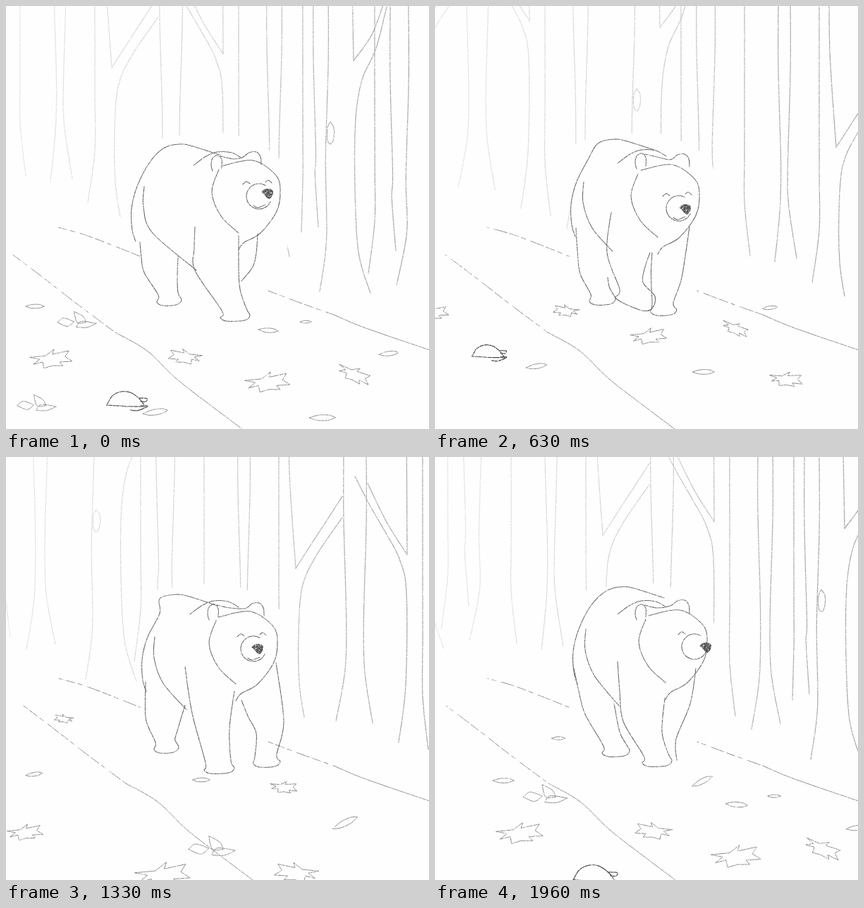
These frames come from a looping animation (600x600 px, 2090 ms). An HTML page:

```html
<!DOCTYPE html>
<html lang="en">
<head>
<meta charset="utf-8">
<title>Bear walking through a forest</title>
<style>
html, body { margin: 0; width: 100%; height: 100%; overflow: hidden; background: #fefefe; }
svg { display: block; width: 100vw; height: 100vh; }
path { fill: none; stroke-linecap: round; stroke-linejoin: round; }
.tree { stroke: url(#haze); stroke-width: 1.3; }
.path { stroke: #858585; stroke-width: 1; }
.leaf { stroke: #858585; stroke-width: 1; }
.rock { stroke: #404040; stroke-width: 1.25; }
.bear { stroke: #626262; stroke-width: 1.1; }
.clear { fill: #fefefe; }
.dash { stroke-dasharray: 13 5 6 8 19 4; }
.nose { stroke: #555; fill: #505050; }
.cel { opacity: 0; animation: 2090ms step-end infinite; }
</style>
</head>
<body>
<svg viewBox="0 0 600 600">
  <defs>
    <linearGradient id="haze" gradientUnits="userSpaceOnUse" x1="0" y1="0" x2="600" y2="0">
      <stop offset="0" stop-color="#e6e6e6"/>
      <stop offset=".5" stop-color="#d0d0d0"/>
      <stop offset=".8" stop-color="#adadad"/>
      <stop offset="1" stop-color="#a6a6a6"/>
    </linearGradient>
    <filter id="pencil" filterUnits="userSpaceOnUse" x="0" y="0" width="600" height="600" color-interpolation-filters="sRGB">
      <feTurbulence type="fractalNoise" baseFrequency=".45" numOctaves="2" seed="4"/>
      <feColorMatrix values="0 0 0 0 0  0 0 0 0 0  0 0 0 0 0  2.4 0 0 0 -.3" result="grain"/>
      <feComposite in="SourceGraphic" in2="grain" operator="in"/>
    </filter>
  </defs>
  <g filter="url(#pencil)"><g id="forest"></g><g id="bear"></g></g>
</svg>
<script>
const LOOP = 2090;
const SCENE_TIMES = [0, 300, 600, 900, 1200, 1500, 1800, LOOP];
const POSE_TIMES = [0, 130, 300, 470, 630, 800, 900, 1030, 1170, 1330, 1500, 1670, 1830, 1960, LOOP];
const forest = document.getElementById("forest");
const bear = document.getElementById("bear");
const sheet = document.head.appendChild(document.createElement("style"));

function add(parent, tag, attrs) {
  const el = document.createElementNS("http://www.w3.org/2000/svg", tag);
  for (const k in attrs) el.setAttribute(k, attrs[k]);
  return parent.appendChild(el);
}

function pairs(n) {
  const pts = [];
  for (let i = 0; i < n.length; i += 2) pts.push([n[i], n[i + 1]]);
  return pts;
}

// Catmull-Rom spline through the points.
function spline(pts) {
  let d = "M" + pts[0];
  for (let i = 0; i < pts.length - 1; i++) {
    const b = pts[i], c = pts[i + 1], a = pts[i - 1] || b, e = pts[i + 2] || c;
    const mix = (p, q, r) => [0, 1].map(k => (p[k] + (q[k] - r[k]) / 6).toFixed(1));
    d += "C" + [mix(b, c, a), mix(c, b, e), c].join(" ");
  }
  return d;
}

// Draws a flat run of coordinates, moved to x, y.
function draw(g, cls, nums, x = 0, y = 0) {
  return add(g, "path", { class: cls, d: spline(pairs(nums).map(p => [p[0] + x, p[1] + y])) });
}

// Shows cel i whenever its turn comes round in the list of times.
function cel(parent, name, i, count, times) {
  const at = ms => ms === LOOP ? "100%" : Math.max(0, (ms - .3) / LOOP * 100).toFixed(4) + "%";
  let keys = "0%{opacity:0}";
  for (let k = i; k < times.length - 1; k += count) {
    keys += `${at(times[k])}{opacity:1}${at(times[k + 1])}{opacity:0}`;
  }
  sheet.textContent += `@keyframes ${name}${i}{${keys}}`;
  return add(parent, "g", { class: "cel", style: `animation-name:${name}${i}` });
}

// --- Forest: one repeating strip of trunks that slides left and up ---
const STRIP = 593, RISE = .27;
const slide = [0, 106, 174, 244, 332, 418, 505];

// Trunk edges: place on the strip, sway of the foot, length, least x.
const trunks = [
  [20, 8, 236], [69, -6, 231], [84, 10, 222], [126, -10, 245], [219, -12, 245],
  [249, 10, 240], [330, 8, 255], [371, -10, 262], [390, 12, 250], [421, -2, 207, 400],
  [437, 6, 195, 400], [456, -11, 282], [523, -9, 238], [546, 7, 200], [570, -16, 242]
];
const forks = [
  { at: 150, art: ["-10 -220 -9 -90 0 47", "0 47 27 5 66 -55", "66 -25 29 29 9 74 4 139 5 210 12 258"] },
  { at: 304, art: ["-52 -115 -25 -60 4 -14", "3 -220 4 -14", "-70 -125 -50 -86 -27 -46 -7 -8 3 40 2 170 -8 252"] },
  { at: 491, art: ["-1 -220 2 -55", "2 -55 28 -92 46 -140", "51 -140 34 -73 14 -28 5 27 4 127 9 217 26 275"] }
];
const knot = [-1, 30, -5, 38, -5, 56, 0, 61, 4, 52, 4, 38, -1, 30];
const hollow = [194, 310, 192, 235, 205, 193, 300, 180, 350, 192, 380, 210, 396, 238, 399, 350, 390, 420, 200, 420];

function eachCopy(place, s, fn) {
  for (const turn of [0, STRIP]) {
    const x = place - slide[s] + turn;
    if (x > -70 && x < 680) fn(x, RISE * x);
  }
}

function growTrees(g, s) {
  trunks.forEach(([place, foot, end, least = -70], i) => {
    const sway = 3 * Math.sin(i * 2.1);
    eachCopy(place, s, (x, y) => {
      if (x > least) draw(g, "tree", [0, -220, -sway / 2, -60, sway, 90, sway / 2, end - 75, foot, end], x, y);
    });
  });
  for (const { at, art } of forks) {
    eachCopy(at, s, (x, y) => art.forEach(a => draw(g, "tree", a.split(" ").map(Number), x, y)));
  }
  eachCopy(461, s, (x, y) => draw(g, "tree", knot, x, y + 10));
  draw(g, "clear", hollow);
}

// --- Trail edges ---
const drift = [-5, -3, 0, 8, 10, 6, 1];
function layTrail(g, s) {
  const lines = [
    ["path dash", [15, 353, 60, 387, 105, 422, 160, 463], drift[s]],
    ["path", [160, 463, 205, 489, 247, 529, 300, 570, 340, 600], drift[s]],
    ["path dash", [74, 314, 110, 324, 150, 339, 190, 355], 0],
    ["path dash", [372, 404, 420, 422, 465, 438], 0],
    ["path", [465, 438, 500, 453, 545, 469, 601, 488], 0]
  ];
  for (const [cls, nums, dx] of lines) {
    draw(g, cls, nums, dx).setAttribute("stroke-dashoffset", s * 11);
  }
}

// --- Litter: everything on the ground shares one motion ---
const ground = [[0, 0], [-24, -28], [-68, -65], [-122, -96], [-172, -126], [-224, -155], [-274, -185]];
const STRIDE = [330, 218];
const shapes = {
  maple: { cls: "leaf", tall: .46, sharp: true, art: ["-50 -6 -13 -14 7 -48 3 -22 42 -40 33 -10 50 14 20 18 28 37 3 37 -17 50 -20 18 -42 30 -27 4 -50 -6"] },
  oval: { cls: "leaf", tall: .22, art: ["-50 0 -15 -45 25 -45 50 0", "-50 0 -20 45 20 45 50 0"] },
  trio: { cls: "leaf", tall: .5, art: ["-2 34 10 5 48 15", "-2 34 25 35 48 15", "-8 -45 0 10 22 10", "-8 -45 15 -20 22 10", "-50 10 -35 -12 -8 6", "-50 10 -25 30 -8 6"] },
  rock: { cls: "rock", tall: .47, art: ["-50 25 -37 -21 -15 -43 8 -36 30 0 40 32", "40 32 5 32 -50 25", "27 -10 45 -8 42 8 30 6", "5 50 24 52 47 30 30 28"] }
};
// kind, x, y, width, turn, first and last scene in which it lies there
const litter = [
  ["maple", 64, 500, 60, 0, -3, 2], ["maple", 254, 497, -48, 0, -3, 4],
  ["maple", 371, 533, 64, 0, -1, 3], ["maple", 494, 522, 50, 30, -1, 3],
  ["maple", 566, 594, 58, 10, 1, 4], ["maple", 199, 658, 70, 0, 3, 4],
  ["oval", 212, 576, 36, -8, 0, 4], ["oval", 449, 584, 37, 0, 0, 6],
  ["oval", 543, 493, 28, -6, -1, 2], ["oval", 41, 426, 26, 0, -1, 0],
  ["oval", 372, 460, 28, 5, -1, 0], ["oval", 425, 448, 16, 0, -1, 0],
  ["oval", 653, 645, 54, -26, 3, 6], ["trio", 101, 446, 56, 0, -1, 0],
  ["trio", 465, 679, 92, 0, 3, 5], ["trio", 44, 564, 56, 0, 0, 1],
  ["rock", 173, 559, 60, 0, -1, 0], ["rock", 146, 556, 62, 0, 1, 4]
];

const hidden = (x, y) => y < 368 || y > 612 || y < 256 + .35 * x - (x < 400 ? 25 : 0)
  || (x > 195 && x < 362 && y < 436);

function strewLitter(g, s) {
  for (const [kind, x0, y0, width, turn, first, last] of litter) {
    for (const lap of [-1, 0, 1]) {
      const n = s + lap * 7;
      if (n < first || n > last) continue;
      const x = x0 + ground[s][0] - lap * STRIDE[0];
      const y = y0 + ground[s][1] - lap * STRIDE[1];
      if (hidden(x, y)) continue;
      const { cls, tall, sharp, art } = shapes[kind];
      const w = width * (y - 200) / (y0 - 200) / 100, h = Math.abs(w) * tall;
      const c = Math.cos(turn * Math.PI / 180), k = Math.sin(turn * Math.PI / 180);
      for (const a of art) {
        const pts = pairs(a.split(" ").map(Number))
          .map(([u, v]) => [x + u * w * c - v * h * k, y + u * w * k + v * h * c].map(q => q.toFixed(1)).map(Number));
        add(g, "path", { class: cls, d: sharp ? "M" + pts.join("L") : spline(pts) });
      }
    }
  }
}

slide.forEach((_, s) => {
  const g = cel(forest, "scene", s, slide.length, SCENE_TIMES);
  growTrees(g, s);
  layTrail(g, s);
  strewLitter(g, s);
});

// --- Bear ---
// A full leg is: outer top, outer knee, paw left and floor, paw width, inner knee, inner top.
function leg(g, v) {
  if (v.length !== 11) return draw(g, "bear", v);
  const [x1, y1, kx, ky, px, py, w, jx, jy, x2, y2] = v;
  draw(g, "bear", [
    x1, y1, (x1 + kx) / 2 - 1, (y1 + ky) / 2, kx, ky, px + 2, py - 15, px, py - 5, px + 9, py,
    px + w - 8, py - 1, px + w, py - 8, px + w - 5, py - 18, jx, jy, x2, y2
  ]);
}

function torso(g, [tx, ty, lx], frontX, [ex, ey]) {
  draw(g, "bear", [60, 16, 20, 3, 0, 0, -22, 6].map((n, i) => n + (i % 2 ? ty : tx))
    .concat([25, 27, 8, 60, 0, 92, 1, 122, 6, 138].map((n, i) => n + (i % 2 ? ty : lx))));
  draw(g, "bear", [lx + 18, ty + 60, lx + 17, ty + 90, lx + 30, ty + 126, frontX + 2, ty + 1.1 * frontX - 116]);
  draw(g, "bear", [-34, 4, -16, -9, 0, -15, 20, -14, 35, -6], ex, ey);
}

function head(g, [cx, cy], [mx, my], [nx, ny], [ex, ey], [rx, ry]) {
  draw(g, "bear", [-34, -35, 10, -43, 42, -23, 49, -1, 44, 29, 21, 60, -3, 74, -10, 84], cx, cy);
  draw(g, "bear", [-38, -30, -48, 2, -35, 36, -10, 60], cx, cy);
  draw(g, "bear", [-7, 12, -9, 4, -7, -6, 0, -10, 6, -4, 6, 8], ex, ey);
  draw(g, "bear", [ex + 4, ey - 9, ex + 22, ey - 5, rx - 16, ry + 1, rx - 6, ry - 6, rx + 4, ry - 7, rx + 10, ry, rx + 11, ry + 11]);
  const ring = [];
  for (let a = -60; a >= -335; a -= 25) {
    const t = a * Math.PI / 180;
    ring.push(mx + 18 * Math.cos(t), my + 18 * Math.sin(t));
  }
  draw(g, "bear", ring);
  draw(g, "bear", [-5, 2, 0, -2, 5, 1], mx - 18, my - 19);
  if (nx - mx < 14) draw(g, "bear", [-4, 1, 0, -2, 5, 2], mx + 13, my - 21);
  if (mx < 365) draw(g, "bear", [-8, 13, -2, 16, 9, 12], mx, my);
  draw(g, "bear nose", [-8, -2, -3, -6, 6, -5, 7, 1, 3, 7, -1, 5, -5, 0, -8, -2], nx, ny);
}

let count = 0;
function pose({ back, face, hind, front, far }) {
  const g = cel(bear, "pose", count++, 7, POSE_TIMES);
  torso(g, back, front[0], face[3]);
  [hind, front, far].forEach(v => leg(g, v));
  head(g, ...face);
}

pose({
  back: [245, 196, 178],
  face: [[340, 262], [359, 270], [371, 266], [300, 222], [351, 214]],
  hind: [190, 335, 196, 378, 214, 425, 35, 243, 385, 244, 355],
  front: [268, 313, 268, 375, 304, 447, 42, 331, 395, 330, 325],
  far: [357, 323, 355, 350, 350, 370, 334, 390]
});
pose({
  back: [242, 195, 186],
  face: [[338, 262], [356, 271], [364, 270], [297, 221], [353, 214]],
  hind: [191, 328, 198, 376, 212, 423, 35, 243, 390, 249, 354],
  front: [261, 305, 267, 373, 293, 448, 42, 325, 390, 327, 328],
  far: [340, 362, 350, 380, 345, 405, 27, 376, 360, 370, 300]
});
pose({
  back: [240, 195, 193],
  face: [[336, 262], [351, 272], [357, 272], [295, 219], [355, 214]],
  hind: [198, 318, 199, 375, 210, 420, 35, 241, 395, 254, 352],
  front: [254, 297, 266, 372, 281, 449, 43, 317, 385, 324, 332],
  far: [334, 345, 355, 392, 351, 440, 38, 394, 375, 383, 292]
});
pose({
  back: [255, 186, 200],
  face: [[318, 270], [321, 281], [324, 276], [284, 218], [337, 213]],
  hind: [205, 305, 196, 365, 200, 402, 41, 229, 375, 243, 338],
  front: [241, 285, 250, 362, 257, 440, 39, 296, 385, 301, 342],
  far: [314, 340, 320, 380, 323, 443, 38, 361, 388, 371, 290]
});
pose({
  back: [253, 189, 193],
  face: [[326, 268], [346, 287], [355, 288], [293, 219], [350, 217]],
  hind: [200, 315, 206, 380, 219, 424, 37, 247, 398, 245, 385],
  front: [250, 292, 244, 350, 262, 402, 257, 415, 290, 431, 307, 430, 312, 412, 295, 392, 298, 370, 305, 350],
  far: [308, 350, 307, 400, 306, 439, 37, 350, 385, 361, 313]
});
pose({
  back: [270, 184, 194],
  face: [[340, 262], [373, 277], [384, 278], [304, 216], [365, 213]],
  hind: [202, 330, 207, 380, 229, 426, 38, 258, 395, 253, 360],
  front: [258, 290, 262, 365, 291, 442, 40, 323, 385, 319, 315],
  far: [367, 305, 360, 360, 341, 405, 336, 428]
});
pose({
  back: [265, 184, 196],
  face: [[337, 260], [368, 269], [384, 270], [293, 219], [350, 210]],
  hind: [197, 300, 213, 365, 237, 425, 39, 262, 390, 254, 350],
  front: [259, 290, 267, 375, 294, 439, 42, 322, 390, 326, 342],
  far: [370, 300, 362, 350, 342, 400, 343, 430]
});
</script>
</body>
</html>
```
